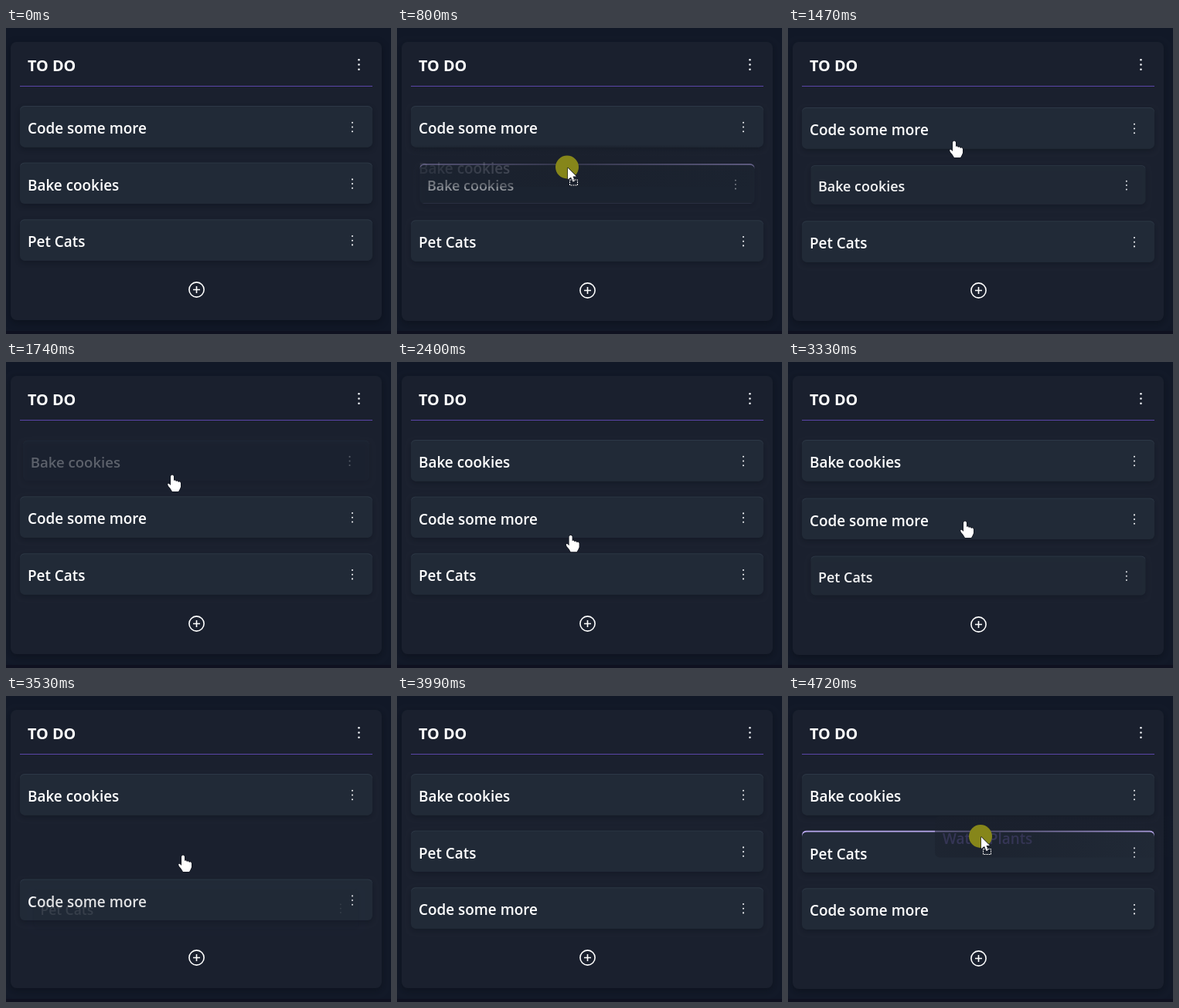
Animation, 498 px wide and 397 px high, one loop 4790 ms. Source, as an HTML page with a canvas:

```html
<!DOCTYPE html>
<html lang="en">
<head>
<meta charset="utf-8">
<title>To do list</title>
<style>
html, body { margin: 0; width: 498px; height: 397px; overflow: hidden; background: #111827; }
canvas { display: block; }
</style>
</head>
<body>
<canvas id="stage" width="498" height="397"></canvas>
<script>
const c = document.getElementById('stage').getContext('2d');
const LOOP = 4790, STEP = LOOP / 72;
const FONT = '"Open Sans", "Noto Sans", sans-serif';
const WHITE = [255, 255, 255], PURPLE = [167, 139, 250];

// Each drag swaps the card in row `from` with the one above it.
const drags = [
  { order: ['Code some more', 'Bake cookies', 'Pet Cats'], from: 1, grab: [220, 202.5],
    start: 720, drop: 1462, tint: 0 },
  { order: ['Bake cookies', 'Code some more', 'Pet Cats'], from: 2, grab: [228, 277],
    start: 2655, drop: 3325, tint: 1 }
];

// Pointer path: time, x, y
const path = [
  [200, 345, 385], [400, 268, 262], [600, 222, 207], [730, 220, 201], [800, 220, 180], [1000, 215, 147],
  [2100, 215, 147], [2300, 222, 200], [2590, 230, 277], [2660, 229, 275], [2790, 227, 218],
  [2930, 229, 207], [3800, 229, 207], [3860, 280, 214], [3930, 383, 222],
  [4590, 470, 196], [4655, 358, 189], [4720, 249, 182]
];

const clamp = v => Math.max(0, Math.min(1, v));
const mix = (a, b, p) => a + (b - a) * p;
const inOut = p => p < 0.5 ? 4 * p ** 3 : 1 - 4 * (1 - p) ** 3;
const rowTop = row => 101 + row * 73.6;
const blend = p => `rgb(${WHITE.map((v, i) => mix(v, PURPLE[i], p))})`;

function pointer(t) {
  const i = path.findIndex(k => k[0] > t);
  if (i < 0) return path[path.length - 1].slice(1);
  if (!i) return path[0].slice(1);
  const a = path[i - 1], b = path[i], p = (t - a[0]) / (b[0] - a[0]);
  return [mix(a[1], b[1], p), mix(a[2], b[2], p)];
}

function box(x, y, w, h, r, fill) {
  c.beginPath();
  c.roundRect(x, y, w, h, r);
  c.fillStyle = fill;
  c.fill();
}

function text(str, x, y, fill, weight = 600, size = 18.9) {
  c.font = `${weight} ${size}px ${FONT}`;
  c.fillStyle = fill;
  c.fillText(str, x, y);
}

function dots(x, y, gap, r) {
  c.fillStyle = '#eef0f4';
  for (const k of [-1, 0, 1]) {
    c.beginPath();
    c.arc(x, y + k * gap, r, 0, 7);
    c.fill();
  }
}

function shadow(blur, dy, color) {
  c.shadowBlur = blur;
  c.shadowOffsetY = dy;
  c.shadowColor = color;
}

function card(name, top, { alpha = 1, scale = 1, tint = 0, line = false } = {}) {
  const grow = line ? 1 : 0, h = 53.5 + grow;
  c.save();
  c.globalAlpha = alpha;
  c.translate(246, top + h / 2);
  c.scale(scale, scale);
  c.translate(-246, -h / 2);
  shadow(6, 3, 'rgba(10,14,24,.35)');
  box(18, 0, 456, h, 6, '#212a37');
  shadow(0, 0, 'transparent');
  // Top border: the sliver between the card and its copy moved down
  c.beginPath();
  c.roundRect(18, 0, 456, h, 6);
  c.clip();
  c.beginPath();
  c.rect(18, 0, 456, h);
  c.roundRect(18, 1 + grow, 456, h + 9, 6);
  c.fillStyle = line ? '#b9a8ee' : '#2d3846';
  c.fill('evenodd');
  text(name, 28, 36 + grow, blend(tint));
  dots(448, 27.5 + grow, 5.7, 1.05);
  c.restore();
}

function board(extra) {
  c.fillStyle = '#111827';
  c.fillRect(0, 0, 498, 397);
  c.fillStyle = '#0f1120';
  c.fillRect(0, 393, 498, 4);
  shadow(8, 3, 'rgba(8,11,20,.5)');
  box(6, 18, 480, 361 + extra, 8, '#1a202e');
  shadow(0, 0, 'transparent');
  text('TO DO', 28, 56, '#fff', 700, 19.8);
  dots(456.5, 47.5, 6.2, 1.3);
  c.fillStyle = '#5b45a8';
  c.fillRect(18, 75, 456, 1);
  c.strokeStyle = '#fff';
  c.lineWidth = 1.6;
  const y = 339.5 + extra;
  c.beginPath();
  c.arc(246.5, y, 9.6, 0, 7);
  c.moveTo(242, y);
  c.lineTo(251, y);
  c.moveTo(246.5, y - 4.5);
  c.lineTo(246.5, y + 4.5);
  c.stroke();
}

// Drag image: strongest at the pointer, fading outwards.
function ghost(name, left, top, x, y, rgb) {
  const fade = (color, a) => {
    const g = c.createRadialGradient(x, y, 0, x, y, 270);
    g.addColorStop(0, `rgba(${color},${a})`);
    g.addColorStop(1, `rgba(${color},0)`);
    return g;
  };
  box(left, top, 456, 53.5, 6, fade([26, 32, 44], 0.65));
  text(name, left + 10, top + 36, fade(rgb, 0.3));
}

function shape(points, x, y) {
  c.save();
  c.translate(x, y);
  const p = new Path2D(points);
  c.fillStyle = '#fff';
  c.strokeStyle = '#10131c';
  c.lineWidth = 1.2;
  c.lineJoin = 'round';
  c.stroke(p);
  c.fill(p);
  c.restore();
}

function hand(x, y) {
  shape('M-2 1Q0-2 2 1V7Q4 5 5 8Q7 6 8 9Q10 7 11 10V15Q10 18 8 21H0Q-2 17-5 14Q-7 10-4 11L-2 13Z', x, y);
}

function dragArrow(x, y) {
  shape('M0 0V15L4 12L6.5 18L9 17L6.5 11H11Z', x + 1, y + 1);
  c.save();
  c.lineWidth = 1;
  c.strokeStyle = '#10131c';
  c.strokeRect(x + 3.5, y + 16.5, 10, 7);
  c.setLineDash([2, 1]);
  c.strokeStyle = '#fff';
  c.strokeRect(x + 3.5, y + 16.5, 10, 7);
  c.restore();
}

function draw(t) {
  const d = t < 2000 ? drags[0] : drags[1];
  const { order, from } = d, to = from - 1;
  const [x, y] = pointer(t);
  const visiting = t > 4580;
  const dragging = t > d.start && t < d.drop;
  const u = t - d.drop, dropped = u >= 0;

  let target = -1;
  if (visiting) target = 1;
  else if (dragging) target = [0, 1, 2].findIndex(r => y > rowTop(r) - 10 && y < rowTop(r) + 56);
  const extra = target >= 0 ? 1 : dropped ? 2 * (1 - clamp(u / 180)) : 0;
  board(Math.min(1, extra));

  order.forEach((name, i) => {
    if (i === from) return;
    const slide = i === to && dropped ? inOut(clamp(u / 300)) : 0;
    const row = i + slide, at = Math.round(row);
    const push = target >= 0 ? +(at > target) : i >= to ? extra : 0;
    card(name, rowTop(row) + push, { line: target === at });
  });

  // The dragged card fades out of its old row, then into the new one.
  const name = order[from], line = target === from;
  const top = rowTop(from) + (target >= 0 ? +(from > target) : extra);
  if (!dropped) {
    const held = clamp((t - d.start + 40) / 80);
    const tint = d.tint * clamp((t - d.start + 250) / 180);
    card(name, top, dragging ? { alpha: mix(1, 0.5, held), scale: 0.95, tint, line } : { tint });
  } else if (u < 225) {
    card(name, top, { alpha: 0.95 * (1 - u / 225), scale: 0.95 - 0.025 * u / 200 });
  }
  if (u > 210) {
    const p = clamp((u - 210) / 200);
    const tint = t > 3850 && t < 3980 ? 0.9 : 0;
    card(name, rowTop(to), { alpha: p, scale: mix(0.976, 1, p), tint, line: visiting });
  }

  if (dragging) {
    ghost(name, 18 + x - d.grab[0], rowTop(from) + y - d.grab[1], x, y, [200, 200, 215]);
  }
  if (visiting) ghost('Water Plants', x - 59, y - 26, x, y, [120, 100, 190]);

  if (!(t > 195 && t < 3980 || visiting)) return;
  if (t > d.start - 70 && t < d.drop || visiting) {
    c.beginPath();
    c.arc(x, y, 15, 0, 7);
    c.fillStyle = '#86861a';
    c.fill();
  }
  (dragging || visiting ? dragArrow : hand)(x, y);
}

// The picture advances in even steps.
function frame(now) {
  const t = now % LOOP;
  draw(Math.floor(t / STEP + 0.15) * STEP);
  requestAnimationFrame(frame);
}
requestAnimationFrame(frame);
</script>
</body>
</html>
```
